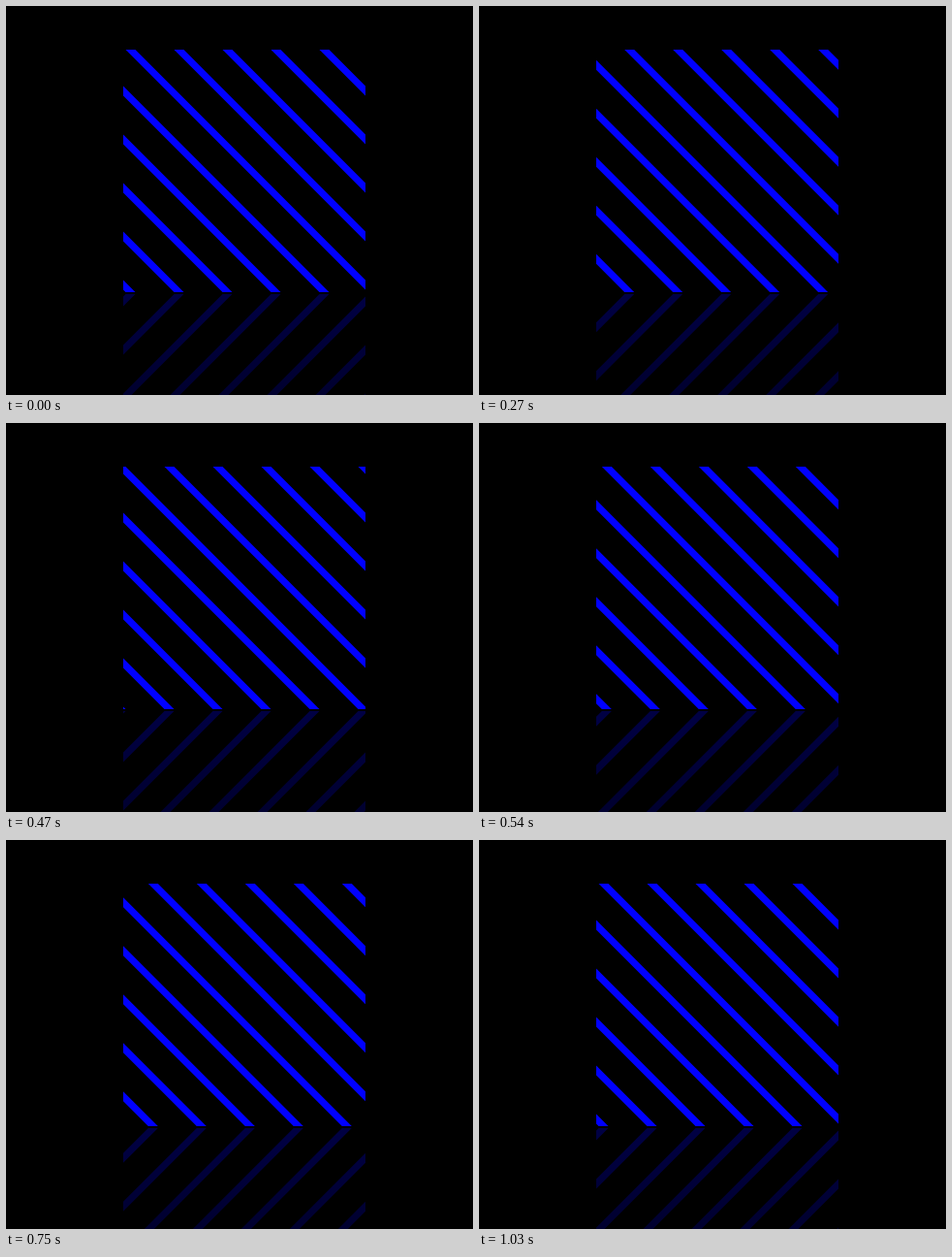
Write an HTML page that moves like this. It is 482 px wide and 401 px high and loops after 1.09 s.

```html
<!DOCTYPE html>
<html lang="en">
<head>
<meta charset="utf-8">
<title>Moving stripes</title>
<style>
  html, body { margin: 0; width: 100%; height: 100%; overflow: hidden; background: #000; }
  svg.stage { display: block; width: 100vw; height: 100vh; }
</style>
</head>
<body>
<svg class="stage" viewBox="0 0 482 401">
  <defs>
    <linearGradient id="fade" gradientUnits="userSpaceOnUse" x1="0" y1="0" x2="0" y2="250">
      <stop offset="0" stop-color="#00f" stop-opacity=".07"/>
      <stop offset="1" stop-color="#00f" stop-opacity=".267"/>
    </linearGradient>
    <clipPath id="box"><rect width="250" height="250"/></clipPath>
    <path id="stripes" fill="none" stroke-width="7.07"/>
  </defs>
  <rect width="482" height="401" fill="#000"/>
  <g transform="translate(121 45)" clip-path="url(#box)">
    <use href="#stripes" stroke="#00f"/>
  </g>
  <!-- mirror image below the box, after a 2px gap -->
  <g transform="translate(121 547) scale(1 -1)" clip-path="url(#box)">
    <use href="#stripes" stroke="url(#fade)"/>
  </g>
</svg>
<script>
  const LOOP = 1090, SIZE = 250, PERIOD = 50, TRAVEL = 100, START = 7.5;
  const STEPS = [0, 70, 130, 200, 270, 340, 410, 480, 540, 610, 680, 750, 820, 890, 960, 1030];
  const stripes = document.getElementById('stripes');

  function draw(time) {
    const step = STEPS.findLastIndex(start => start <= time);
    const shift = (START + TRAVEL * step / (STEPS.length - 1)) % PERIOD;
    let d = '';
    for (let x = shift - SIZE - PERIOD; x < SIZE + PERIOD; x += PERIOD) {
      d += `M${x - 10} -10L${x + SIZE + 10} ${SIZE + 10}`;
    }
    stripes.setAttribute('d', d);
  }

  const origin = performance.now();
  function frame() {
    draw((performance.now() - origin) % LOOP);
    requestAnimationFrame(frame);
  }
  frame();
</script>
</body>
</html>
```
